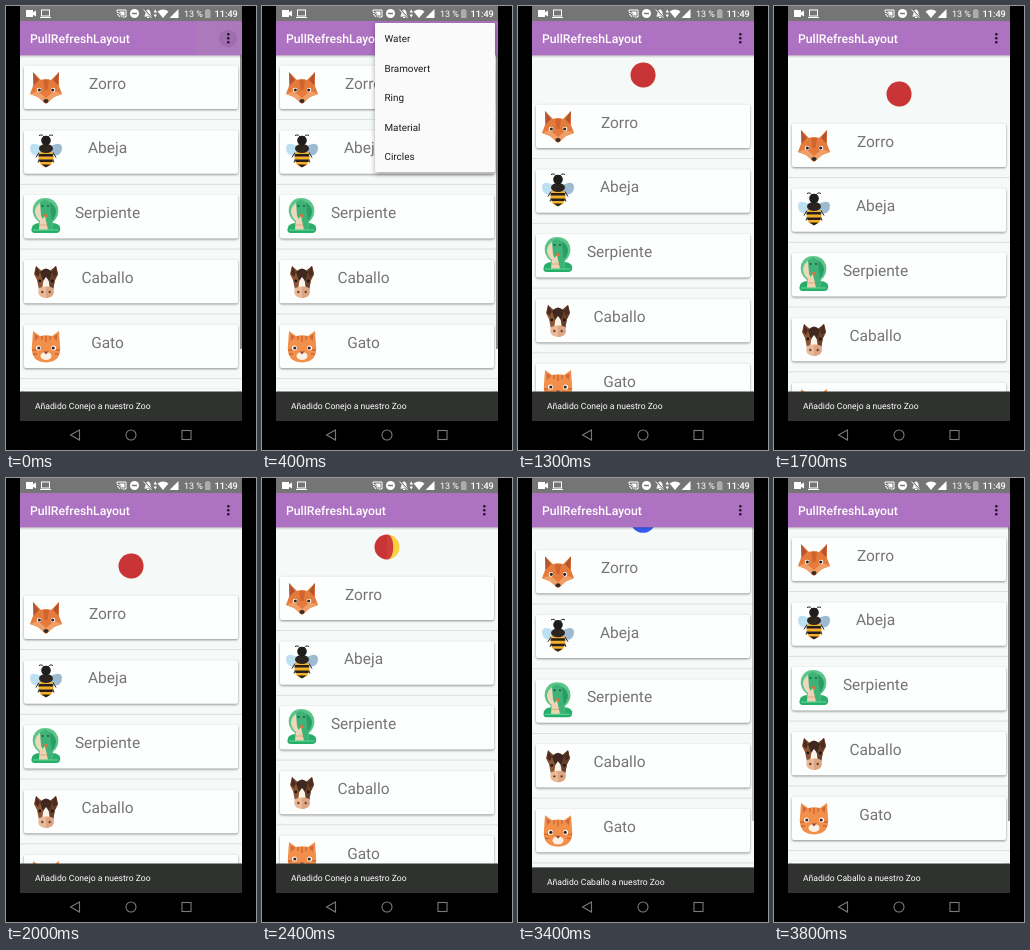
An HTML page that plays this animation: 250 px wide and 444 px high, repeating every 3900 ms.

```html
<!DOCTYPE html>
<html lang="es">
<head>
<meta charset="utf-8">
<title>PullRefreshLayout</title>
<style>
html, body { margin: 0; width: 100%; height: 100%; overflow: hidden; background: #000; }
svg { display: block; width: 250px; height: 444px; font-family: Roboto, sans-serif; text-rendering: geometricPrecision; }
.card { fill: #fdfffe; filter: drop-shadow(0 1px .8px rgba(0, 0, 0, .42)); }
.name { font-size: 15.5px; fill: #757575; text-anchor: middle; }
.item { font-size: 9.9px; fill: #1c1c1c; }
#popup { filter: drop-shadow(0 2px 2.5px rgba(0, 0, 0, .35)); }
</style>
</head>
<body>
<svg viewBox="0 0 250 444">
  <defs>
    <clipPath id="screen"><rect x="14" y="49" width="222" height="366"/></clipPath>
    <linearGradient id="drop" x2="0" y2="1">
      <stop offset="0" stop-color="#000" stop-opacity=".22"/>
      <stop offset="1" stop-color="#000" stop-opacity="0"/>
    </linearGradient>

    <g id="fox">
      <path d="M3 0 11 8Q16 6 21 8L29 0 29 14 32 22 24 25 16 32 8 25 0 22 3 14Z" fill="#e47a3c"/>
      <path d="M3 0 9 8 4 13ZM29 0 23 8 28 13Z" fill="#b4552f"/>
      <path d="M0 22 8 19 16 26 24 19 32 22 24 25 16 32 8 25Z" fill="#f0a066"/>
      <path d="M13 8H19L17.500 18H14.500Z" fill="#d0652f"/>
      <circle cx="9" cy="18" r="2.300" fill="#fff"/><circle cx="23" cy="18" r="2.300" fill="#fff"/>
      <circle cx="9.300" cy="18" r="1.600" fill="#33261f"/><circle cx="22.700" cy="18" r="1.600" fill="#33261f"/>
      <ellipse cx="16" cy="29" rx="2.600" ry="2" fill="#3c2a22"/>
    </g>

    <g id="bee">
      <path d="M9 5Q13 3 14.500 8M23 5Q19 3 17.500 8" fill="none" stroke="#222"/>
      <path d="M12 16Q1 10 0 17 0 24 6 25 11 24 12 16Z" fill="#bcdff1"/>
      <path d="M20 16Q31 10 32 17 32 24 26 25 21 24 20 16Z" fill="#9dbbd0"/>
      <path d="M9 22 6 27M23 22 26 27M10 27 8 32M22 27 24 32" stroke="#222"/>
      <ellipse cx="16" cy="27" rx="7.500" ry="9.500" fill="#f3b02d"/>
      <path d="M8.800 23.500H23.200V26H8.500ZM8.800 29H23.200L22.300 31.500H9.700ZM11.500 34H20.500L16 37Z" fill="#261e1a"/>
      <ellipse cx="16" cy="18" rx="7" ry="4.500" fill="#2b2521"/>
      <circle cx="16" cy="10" r="4.800" fill="#1f1d1c"/>
    </g>

    <g id="snake">
      <path d="M2 30Q4 26 10 26H22Q28 26 30 30 31 36 26 36H5Q0 36 2 30Z" fill="#27ae69"/>
      <path d="M15 1Q25 1 28 10 30 19 23 25V33H9V25Q1 19 3 10 6 1 15 1Z" fill="#5cc58a"/>
      <path d="M13 5Q6 7 5 14 5 20 11 25L14 17Z" fill="#ecd9bd"/>
      <path d="M18 5Q25 7 26 14 26 20 21 25L18 17Z" fill="#2b9c63"/>
      <path d="M10 6Q15 0 20 6L21 16 23 33H16L11 18Z" fill="#3fb277"/>
      <path d="M10 24 15 19 18 33H9Z" fill="#efd3b0"/>
      <path d="M9 28H17" stroke="#d8ae82"/>
      <circle cx="16" cy="18.500" r="1.800" fill="#e2703d"/>
      <circle cx="12.500" cy="9" r="1" fill="#20503a"/><circle cx="18" cy="9" r="1" fill="#20503a"/>
      <path d="M3 33H28" stroke="#59d092" stroke-width="1.200"/>
    </g>

    <g id="horse">
      <path d="M6 0 12 5H20L26 0 28 8 25 14 23 24H9L7 14 4 8Z" fill="#8b5636"/>
      <path d="M16 5H20L26 0 28 8 25 14 23 24H16Z" fill="#66402b"/>
      <path d="M6 0 10 6 8 11 5 8ZM26 0 22 6 24 11 27 8Z" fill="#4c2c20"/>
      <path d="M14 10H18L20 24H12Z" fill="#fbf3ea"/>
      <path d="M10 6Q16 -1 22 6L19 15 16 11 13 15Z" fill="#40271f"/>
      <path d="M9 22Q16 19 23 22 26 31 16 32 6 31 9 22Z" fill="#eab998"/>
      <path d="M16 20.500Q20 20.500 23 22 26 31 16 32Z" fill="#dca583"/>
      <circle cx="9.800" cy="15" r="1.400" fill="#211613"/><circle cx="22.200" cy="15" r="1.400" fill="#211613"/>
      <circle cx="12.300" cy="26" r="1.200" fill="#6d4432"/><circle cx="19.700" cy="26" r="1.200" fill="#6d4432"/>
    </g>

    <g id="cat">
      <path d="M3 1 10 6Q16 4.500 22 6L29 1 30 15Q32 32 16 32.500 0 32 2 15Z" fill="#f18f4b"/>
      <path d="M4.500 4 9 7 5 11ZM27.500 4 23 7 27 11Z" fill="#d4683a"/>
      <path d="M16 6V12M12 6V10M20 6V10M2 20H6M3 24H7M30 20H26M29 24H25" stroke="#cf6732" stroke-width="1.400"/>
      <circle cx="8.500" cy="18" r="2.500" fill="#fff"/><circle cx="23.500" cy="18" r="2.500" fill="#fff"/>
      <circle cx="8.800" cy="18" r="1.600" fill="#332923"/><circle cx="23.200" cy="18" r="1.600" fill="#332923"/>
      <ellipse cx="16" cy="26" rx="5.500" ry="4" fill="#fdf1e6"/>
      <path d="M13.500 21.500H18.500L16 24.500Z" fill="#8e4a3c"/>
    </g>
  </defs>

  <rect width="250" height="444"/>

  <g clip-path="url(#screen)">
    <rect x="14" y="49" width="222" height="365" fill="#f5f9f7"/>
    <g id="ball">
      <path id="half1"/><path id="half2"/><path id="lens"/>
    </g>
    <g id="list"></g>
    <rect id="bar" x="234" y="49" width="2" height="294" fill="#8d9190"/>
    <rect x="14" y="49" width="222" height="3" fill="url(#drop)"/>
    <g id="snack">
      <rect x="14" y="385.500" width="222" height="30" fill="#303230"/>
      <text id="note" x="29" y="403" font-size="8.600" fill="#fff"></text>
    </g>
  </g>

  <rect x="14" y="15" width="222" height="34.300" fill="#ad72c1"/>
  <g id="press">
    <rect x="190" y="16" width="45" height="32" fill="#a3a3a3" opacity=".15"/>
    <circle cx="222" cy="32.500" r="9" fill="#6c4878" opacity=".2"/>
  </g>
  <text x="24" y="36.800" font-size="12.200" font-weight="500" fill="#fff">PullRefreshLayout</text>
  <g fill="#1d1420">
    <circle cx="222.300" cy="28.300" r="1.300"/><circle cx="222.300" cy="32.300" r="1.300"/><circle cx="222.300" cy="36.300" r="1.300"/>
  </g>

  <rect x="14" width="222" height="15" fill="#757575"/>
  <g fill="#fff">
    <path d="M20 4H27V6.300L30 4.500V10.500L27 8.700V11H20Z"/>
    <path d="M34 11H45V12H34Z"/>
    <rect x="35.500" y="4" width="8" height="6" fill="none" stroke="#fff"/>
    <g transform="translate(3.500 0)">
      <path d="M107.500 6V4H116.500V11H113M107.500 8.500Q110 8.500 110 11M107.500 6.500Q112 6.500 112 11" fill="none" stroke="#fff"/>
      <path d="M110 5.500H115V9.500H113Z"/>
      <circle cx="125" cy="7.500" r="4.500"/>
      <path d="M122.500 7.500H127.500" stroke="#757575" stroke-width="1.400"/>
      <path d="M134.500 10.500Q136 9 136 7 136 4 138.500 3.500 141 4 141 7 141 9 142.500 10.500ZM137.500 11H139.500V12H137.500Z"/>
      <path d="M134.500 3.500 142.500 12" stroke="#757575" stroke-width="1.800"/>
      <path d="M134 3.500 142 12" stroke="#fff" stroke-width=".9"/>
    </g>
    <path id="traffic" d="M147.500 6.500 149.300 3.500 151 6.500ZM147.500 8.500 149.300 11.500 151 8.500Z"/>
    <path d="M151.500 5.500Q157 1.500 162.500 5.500L157 12Z"/>
    <path d="M172.500 3V12H163.500Z"/>
    <path d="M199 4H200.500V3H203V4H204.500V12H199Z" opacity=".4"/>
    <text x="178" y="11.200" font-size="9">13 %</text>
    <text x="208.500" y="11.200" font-size="9.200" font-weight="500">11:49</text>
  </g>

  <g id="popup">
    <rect x="113" y="17" width="120" height="149" rx="1" fill="#fafafa"/>
    <rect id="shade" x="113" y="17" width="120" height="149" rx="1"/>
    <rect id="pick" x="113" y="136" width="120" height="30" opacity=".07"/>
    <g id="items"></g>
  </g>

  <g fill="none" stroke="#7a7a7a" stroke-width="1.100">
    <path d="M73.500 424V434L64.500 429Z"/>
    <circle cx="125" cy="429" r="5"/>
    <rect x="176" y="424.500" width="9" height="9"/>
  </g>
</svg>

<script>
const LOOP = 3900, STEP = 100;
const ROW = 64.75, REST = 39, PULLED = 58, R = 12.5;
const RED = '#c93437', BLUE = '#375bf1', YELLOW = '#f7d23e', GREEN = '#34a350';
// first half, second half, folds vertically, direction
const FOLDS = [
  [RED, BLUE, true, 1],
  [RED, YELLOW, false, -1],
  [YELLOW, GREEN, true, -1],
  [BLUE, GREEN, false, 1]
];
const RELEASE = 2000, SPIN = 2200, DONE = 3300, FOLD_MS = 800;

const $ = id => document.getElementById(id);
const set = (id, attrs) => {
  for (const k in attrs) $(id).setAttribute(k, attrs[k]);
};
const ramp = (t, a, b) => Math.min(1, Math.max(0, (t - a) / (b - a)));
const mix = (a, b, k) => a + (b - a) * k;
const slow = k => 1 - (1 - k) ** 4;

const animals = [
  ['Zorro', 'fox', 66], ['Abeja', 'bee', 124.5 - ROW], ['Serpiente', 'snake', 191 - 2 * ROW],
  ['Caballo', 'horse', 260 - 3 * ROW], ['Gato', 'cat', 324 - 4 * ROW], []
];
$('list').innerHTML = animals.map(([name, icon, y], i) => `
  <g transform="translate(0 ${i * ROW})">
    <rect class="card" x="18" y="59.5" width="214" height="43.5" rx="2"/>
    ${name ? `<use href="#${icon}" x="24" y="${y}"/>
    <text class="name" x="101.5" y="82.6">${name}</text>` : ''}
    <path d="M14 113.6H236" stroke="#dbe0de"/>
  </g>`).join('');

$('items').innerHTML = ['Water', 'Bramovert', 'Ring', 'Material', 'Circles'].map((s, i) =>
  `<text class="item" x="122.5" y="${36 + i * 29.5}">${s}</text>`).join('');

function offset(t) {
  if (t < 1300) return REST * ramp(t, 1000, 1300) ** 1.3;
  if (t < RELEASE) return mix(REST, PULLED, 1 - (1 - ramp(t, 1300, 1700)) ** 2);
  if (t < DONE) return mix(PULLED, REST, slow(ramp(t, RELEASE, RELEASE + 400)));
  return REST * (1 - slow(ramp(t, DONE, DONE + 400)));
}

function drawBall(turn) {
  const state = Math.floor(turn) % 4, p = turn % 1;
  const [first, second, vertical, dir] = FOLDS[state];
  const k = dir * (2 * p - 1) * R / .75;
  const half = side => vertical
    ? `M${-R} 0A${R} ${R} 0 0 ${side} ${R} 0Z`
    : `M0 ${-R}A${R} ${R} 0 0 ${1 - side} 0 ${R}Z`;
  set('half1', { d: half(1), fill: first });
  set('half2', { d: half(0), fill: second });
  set('lens', {
    d: vertical ? `M${-R} 0C${-R} ${k} ${R} ${k} ${R} 0Z` : `M0 ${-R}C${k} ${-R} ${k} ${R} 0 ${R}Z`,
    fill: (p < .5) === (dir < 0) ? first : second,
    opacity: .85 + .15 * Math.abs(2 * p - 1)
  });
}

function draw(t) {
  const y = offset(t);
  set('list', { transform: `translate(0 ${y})` });
  set('ball', { transform: `translate(125 ${y + 30})` });
  drawBall(t >= SPIN && t < DONE ? 1 + (t - SPIN) / FOLD_MS : Math.min(1, y / REST));

  const hide = t < DONE ? ramp(t, 2550, 2800) ** 2 : 1 - slow(ramp(t, DONE, DONE + 250));
  set('snack', { transform: `translate(0 ${hide * 30})` });
  $('note').textContent = `Añadido ${t < 3000 ? 'Conejo' : 'Caballo'} a nuestro Zoo`;
  set('bar', { opacity: t < DONE ? 1 - ramp(t, 400, 1000) : ramp(t, DONE, DONE + 200) });
  set('traffic', { opacity: 1 - Math.floor(t / 500) % 2 });

  const leave = ramp(t, 860, 1000);
  const show = ramp(t, 50, 300) * (1 - leave * .62) * (t < 1000);
  set('popup', { opacity: show, display: show ? 'inline' : 'none' });
  set('shade', { opacity: leave ? .07 : 0 });
  set('pick', { display: t >= 700 ? 'inline' : 'none' });
  set('press', { opacity: 1 - ramp(t, 100, 400) });
}

const start = performance.now();
function tick() {
  const t = (performance.now() - start) % LOOP;
  draw(Math.floor(t / STEP) * STEP);
  requestAnimationFrame(tick);
}
tick();
</script>
</body>
</html>
```
